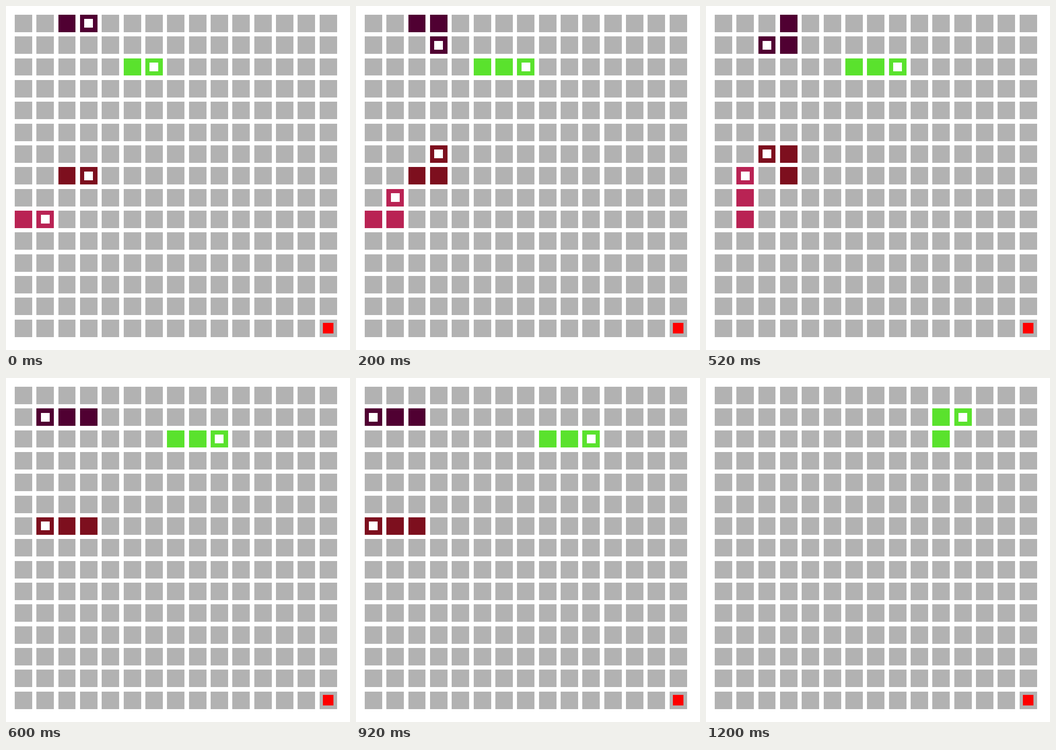
An HTML page with a canvas for the animation above (1.4 s loop, 748 by 748 pixels).

```html
<!DOCTYPE html>
<html lang="en">
<head>
<meta charset="utf-8">
<title>Snakes on a grid</title>
<style>
  html, body { margin: 0; width: 100%; height: 100%; overflow: hidden; background: #fff; }
  canvas { display: block; }
</style>
</head>
<body>
<canvas id="stage" width="748" height="748"></canvas>
<script>
const SIZE = 748, CELLS = 15, STEP = 200, STEPS = 7, LENGTH = 3;
const UNIT = SIZE / 79;
const ctx = document.getElementById('stage').getContext('2d');

const DIRS = { R: [1, 0], L: [-1, 0], U: [0, -1], D: [0, 1] };

// A snake vanishes once its moves run out.
const snakes = [
  { color: '#500032', start: [2, 0], moves: 'RDLLLD' },
  { color: '#5ae22d', start: [5, 2], moves: 'RRRRRUR' },
  { color: '#7d0f1e', start: [2, 7], moves: 'RULLLU' },
  { color: '#b92354', start: [0, 9], moves: 'RUU' }
];

for (const snake of snakes) {
  snake.path = [snake.start];
  for (const move of snake.moves) {
    const [x, y] = snake.path.at(-1);
    const [dx, dy] = DIRS[move];
    snake.path.push([x + dx, y + dy]);
  }
}

// Square centred in a grid cell, inset in units, edges on whole pixels.
function square([col, row], inset, color) {
  const near = n => Math.round((2 + 5 * n + inset) * UNIT);
  const far = n => Math.round((6 + 5 * n - inset) * UNIT);
  ctx.fillStyle = color;
  ctx.fillRect(near(col), near(row), far(col) - near(col), far(row) - near(row));
}

function draw(step) {
  ctx.fillStyle = '#fff';
  ctx.fillRect(0, 0, SIZE, SIZE);
  for (let row = 0; row < CELLS; row++)
    for (let col = 0; col < CELLS; col++) square([col, row], 0, '#b2b2b2');

  square([CELLS - 1, CELLS - 1], 0.75, '#f00');

  const head = step + 1;
  for (const { path, color } of snakes) {
    if (head >= path.length) continue;
    const body = path.slice(Math.max(0, head - LENGTH + 1), head + 1);
    body.forEach(cell => square(cell, 0, color));
    square(path[head], 1, '#fff');
  }
}

const begin = performance.now();
let shown = -1;

function tick() {
  const step = Math.floor((performance.now() - begin) / STEP) % STEPS;
  if (step !== shown) draw(shown = step);
  requestAnimationFrame(tick);
}
tick();
</script>
</body>
</html>
```
